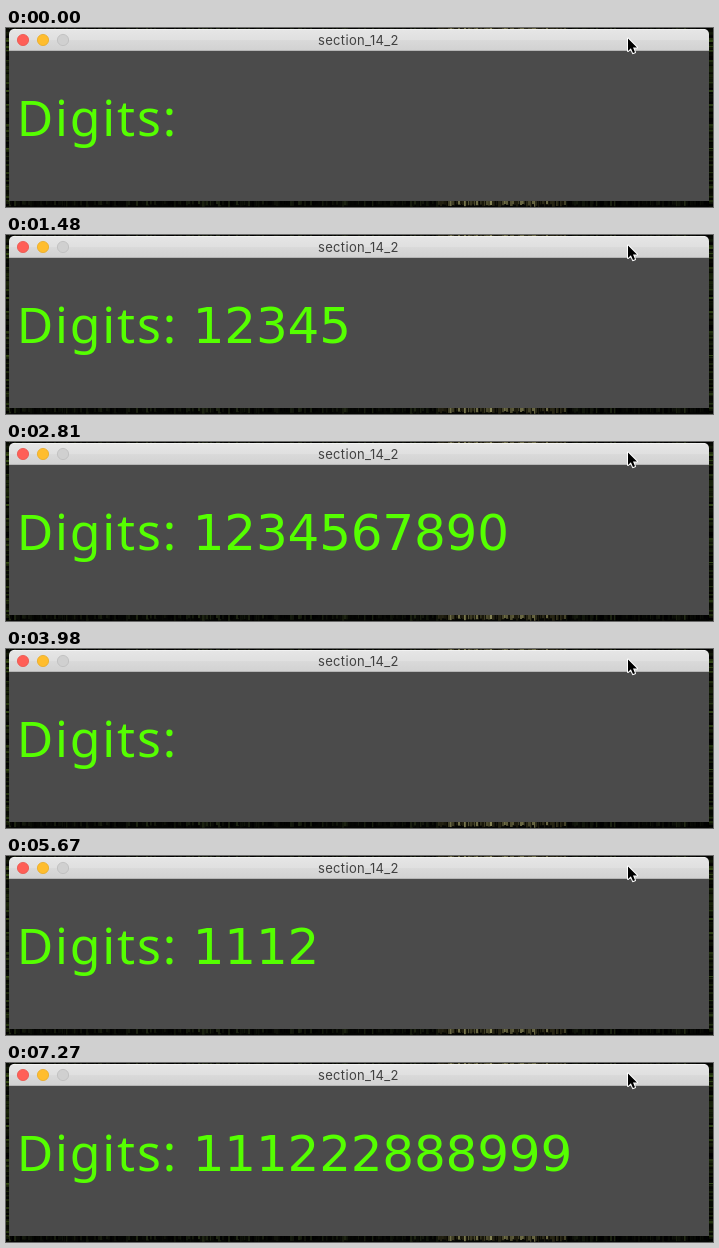
An HTML page with a canvas that plays this animation: 707x179 px, repeating every 8000 ms.

```html
<!DOCTYPE html>
<html lang="en">
<head>
<meta charset="utf-8">
<title>section_14_2</title>
<style>
  html, body { margin: 0; width: 707px; height: 179px; overflow: hidden; background: #000; }
  canvas { display: block; }
</style>
</head>
<body>
<canvas id="stage" width="707" height="179"></canvas>
<script>
const W = 707, H = 179, LOOP = 8000;
const ctx = document.getElementById('stage').getContext('2d');

// Each run of typing: the digits, when each one appears, and when the run is cleared
const runs = [
  { digits: '1234567890', clear: 3980,
    times: [500, 770, 950, 1210, 1480, 1740, 2010, 2280, 2540, 2810] },
  { digits: '111222888999', clear: LOOP,
    times: [5050, 5320, 5490, 5670, 5850, 5930, 6380, 6560, 6730, 6910, 7090, 7270] }
];

function typedAt(t) {
  const run = runs.find(r => t < r.clear);
  return run.digits.slice(0, run.times.filter(at => at <= t).length);
}

function seeded(seed) {
  return () => (seed = (seed * 16807) % 2147483647) / 2147483647;
}

function rect(color, x, y, w, h) {
  ctx.fillStyle = color;
  ctx.fillRect(x, y, w, h);
}

function text(str, x, y, font, spacing, color) {
  ctx.font = font;
  ctx.letterSpacing = spacing + 'px';
  ctx.fillStyle = color;
  ctx.fillText(str, x, y);
}

// Dark foliage that shows around the window
function drawDesktop() {
  const rnd = seeded(1402);
  rect('#040503', 0, 0, W, H);
  for (let x = 0; x < W; x += 2) {
    const lit = x > 430 && x < 560;
    const v = rnd() * rnd() * (lit ? 130 : 45);
    const color = lit ? `rgb(${v + 22},${v + 20},${v * 0.7 + 8})`
                      : `rgb(${v * 0.8},${v},${v * 0.5})`;
    rect(color, x, 173, 1 + rnd() * 2, 3 + rnd() * 3);
    rect(color, x, 0, 2, 1);
  }
  for (let y = 0; y < H; y += 2) {
    const v = rnd() * rnd() * 90;
    rect(`rgb(${v * 0.7},${v},${v * 0.25})`, 0, y, 3, 1 + rnd() * 2);
    rect(`rgb(${v * 0.6},${v * 0.9},${v * 0.25})`, 703, y, 4, 1 + rnd() * 2);
  }
}

function drawLight(x, fill, edge) {
  ctx.beginPath();
  ctx.arc(x, 12, 5.6, 0, Math.PI * 2);
  ctx.fillStyle = fill;
  ctx.fill();
  ctx.lineWidth = 0.8;
  ctx.strokeStyle = edge;
  ctx.stroke();
}

function drawWindow() {
  const bar = ctx.createLinearGradient(0, 1, 0, 22);
  bar.addColorStop(0, '#e6e6e6');
  bar.addColorStop(0.5, '#e0e0e0');
  bar.addColorStop(0.55, '#d9d9d9');
  bar.addColorStop(1, '#d2d2d2');
  ctx.beginPath();
  ctx.roundRect(3, 1, 700, 22, [5, 5, 0, 0]);
  ctx.fillStyle = bar;
  ctx.fill();
  rect('#f2f2f2', 7, 1, 692, 1);
  rect('#b5b5b5', 3, 22, 700, 1);
  rect('#4b4b4b', 3, 23, 700, 150);

  drawLight(17, '#ff5f57', '#e9544c');
  drawLight(37, '#ffbd2e', '#e9ab25');
  drawLight(57, '#d0d0d0', '#bdbdbd');

  text('section_14_2', 312, 17, '13px Inter, sans-serif', 0.33, '#404040');
}

function drawPointer() {
  ctx.save();
  ctx.translate(622, 10.5);
  ctx.beginPath();
  ctx.moveTo(0, 0);
  ctx.lineTo(0, 12.5);
  ctx.lineTo(2.9, 9.8);
  ctx.lineTo(5, 14.6);
  ctx.lineTo(7, 13.8);
  ctx.lineTo(5, 9);
  ctx.lineTo(9, 9);
  ctx.closePath();
  ctx.lineJoin = 'round';
  ctx.lineWidth = 2;
  ctx.strokeStyle = '#fff';
  ctx.stroke();
  ctx.fillStyle = '#000';
  ctx.fill();
  ctx.restore();
}

function drawText(digits) {
  text('Digits:', 10.8, 108, '50px "Noto Sans", sans-serif', 1.8, '#5f0');
  text(digits, 186.7, 108, '50px "DejaVu Sans", sans-serif', -0.2, '#5f0');
}

function draw(t) {
  drawDesktop();
  drawWindow();
  drawText(typedAt(t));
  drawPointer();
}

const start = performance.now();
function tick() {
  draw((performance.now() - start) % LOOP);
  requestAnimationFrame(tick);
}
tick();
</script>
</body>
</html>
```
